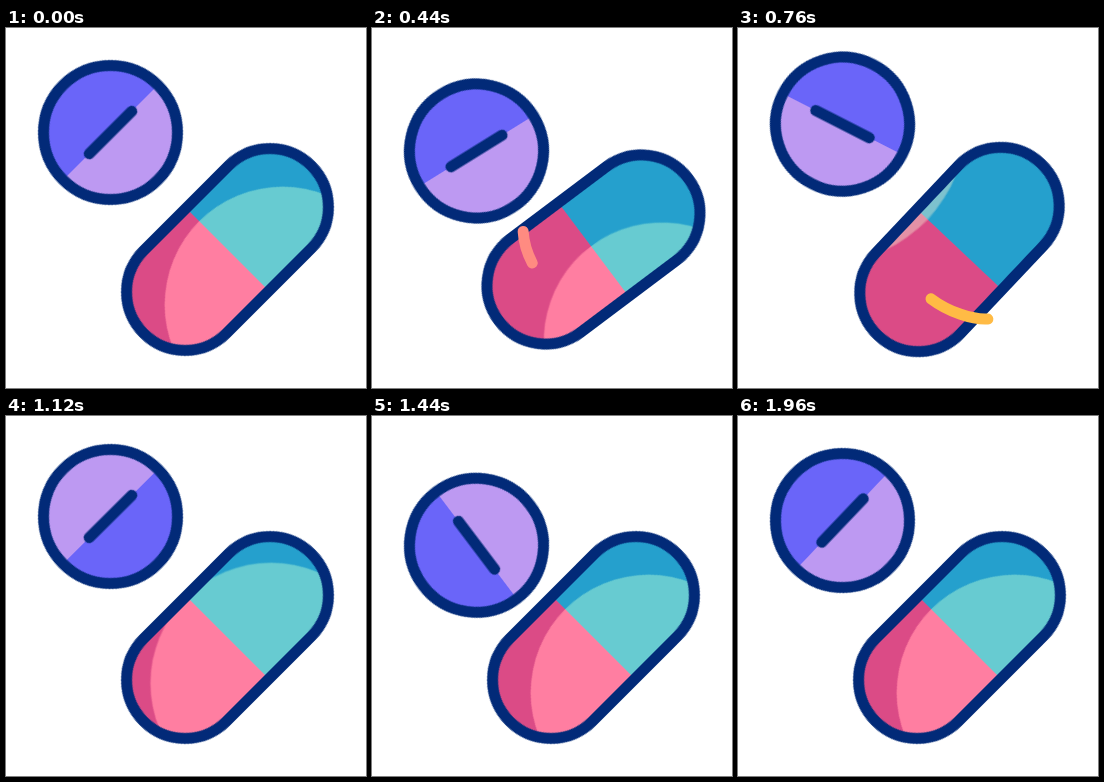
An HTML page without scripts for the animation above (2 s loop, 360x360 px).

```html
<!DOCTYPE html>
<html lang="en">
<head>
<meta charset="utf-8">
<title>Pills</title>
<style>
  html, body { margin: 0; width: 100%; height: 100%; overflow: hidden; background: #fff; }
  svg { display: block; width: 100%; height: 100%; }
  .line { fill: none; stroke: #022a78; stroke-width: 11; stroke-linecap: round; }
  .bob, .spin, .rock, .shine, .streak {
    animation: 2s cubic-bezier(.33, 0, .67, 1) infinite;
  }
  .bob { animation-name: bob; }
  .spin { animation-name: spin; }
  .rock { animation-name: rock; }
  .shine { animation-name: sweep, tint; fill: var(--c); }
  .streak {
    animation-name: run, fade;
    animation-timing-function: linear;
    fill: none; stroke-width: 11; stroke-linecap: round;
  }

  @keyframes bob {
    0%, 4% { transform: translateY(0); }
    24% { transform: translateY(19px); }
    46% { transform: translateY(-20px); }
    71% { transform: translateY(25px); }
    90%, 100% { transform: translateY(0); }
  }
  @keyframes spin {
    0%, 10% { transform: rotate(0deg); animation-timing-function: cubic-bezier(.402, 0, .606, .965); }
    100% { transform: rotate(359.65deg); }
  }
  @keyframes rock {
    0%, 4% { transform: rotate(0deg); }
    19% { transform: rotate(10.4deg); }
    32% { transform: rotate(-6deg); }
    43% { transform: rotate(1.6deg); }
    54%, 100% { transform: rotate(0deg); }
  }
  /* the light disc drops out below, then returns from above */
  @keyframes sweep {
    0%, 10% { transform: translate(0, 78px); animation-timing-function: ease-in; }
    32% { transform: translate(0, 175px); animation-timing-function: step-end; }
    35% { transform: translate(0, -196px) scale(1.18); animation-timing-function: ease-in; }
    38% { transform: translate(0, -184px) scale(1.18); animation-timing-function: linear; }
    46% { transform: translate(-14px, -51px) scale(1.18); animation-timing-function: ease-out; }
    60%, 100% { transform: translate(0, 78px); }
  }
  @keyframes tint {
    0%, 33% { fill: var(--c); animation-timing-function: step-end; }
    34%, 38% { fill: rgba(242, 238, 208, .43); }
    43%, 100% { fill: var(--c); }
  }
  @keyframes run {
    0%, 14% { stroke-dasharray: .1 400; stroke-dashoffset: 0; stroke: #ff7b96; }
    18% { stroke-dasharray: 26 400; stroke-dashoffset: -3; stroke: #ff7b96; }
    34% { stroke: #ffbb45; }
    38% { stroke-dasharray: 62 400; stroke-dashoffset: -106; stroke: #ffbb45; }
    46%, 100% { stroke-dasharray: 10 400; stroke-dashoffset: -177; stroke: #f5b078; }
  }
  @keyframes fade {
    0%, 13.9% { opacity: 0; }
    14%, 43% { opacity: 1; }
    46% { opacity: .52; }
    48%, 100% { opacity: 0; }
  }
</style>
</head>
<body>
<svg viewBox="0 0 360 360">
  <defs>
    <clipPath id="body"><rect x="-118.5" y="-58.5" width="237" height="117" rx="58.5"/></clipPath>
    <clipPath id="left"><rect x="-120" y="-60" width="120" height="120"/></clipPath>
    <clipPath id="right"><rect y="-60" width="120" height="120"/></clipPath>
  </defs>

  <g transform="translate(104.5 104.5)">
    <g class="bob"><g class="spin"><g transform="rotate(-45)">
      <circle r="67" fill="#bd99f2"/>
      <path d="M-67 0A67 67 0 0 1 67 0Z" fill="#6a65f9"/>
      <circle class="line" r="67"/>
      <path class="line" d="M-30 0H30"/>
    </g></g></g>
  </g>

  <g transform="translate(221.5 221.5)">
    <g class="rock"><g transform="rotate(-45)">
      <g clip-path="url(#body)">
        <rect x="-120" y="-60" width="121" height="120" fill="#db4b86"/>
        <rect y="-60" width="120" height="120" fill="#25a0cd"/>
        <g clip-path="url(#left)"><circle class="shine" r="118" style="--c:#ff7ea1"/></g>
        <g clip-path="url(#right)"><circle class="shine" r="118" style="--c:#67cbd1"/></g>
      </g>
      <rect class="line" x="-118.5" y="-58.5" width="237" height="117" rx="58.5"/>
    </g></g>
  </g>

  <path class="streak" pathLength="187" d="M154 180C144 212 160 248 192 270C210 284 235 292 250 291S262 289 268 287"/>
</svg>
</body>
</html>
```
